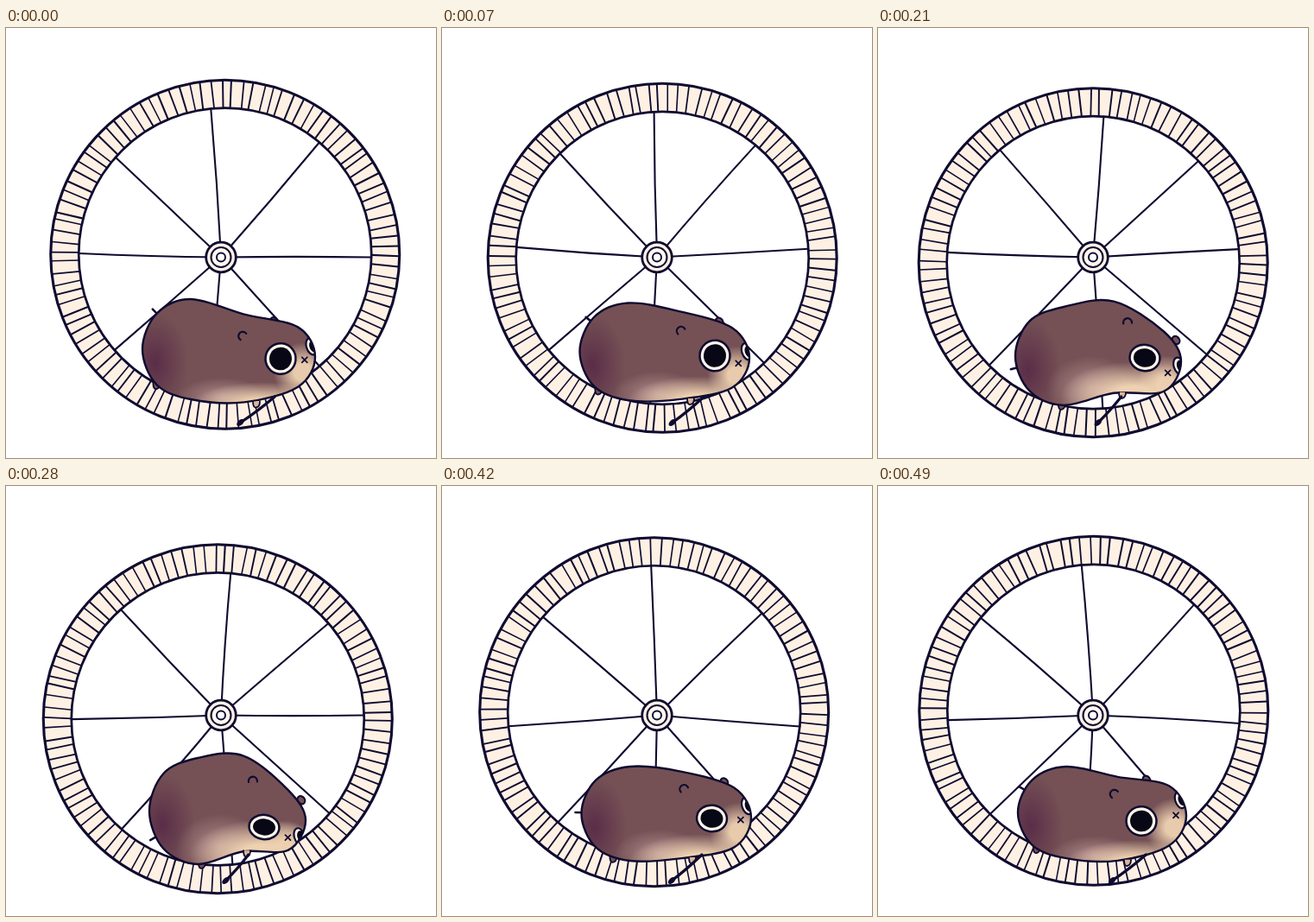
An HTML page with a canvas for the animation above (0.56 s loop, 498x498 px).

```html
<!DOCTYPE html>
<html lang="en">
<head>
<meta charset="utf-8">
<title>Hamster wheel</title>
<style>
html, body { margin: 0; width: 100%; height: 100%; overflow: hidden; background: #fff; }
canvas { display: block; width: 498px; height: 498px; }
</style>
</head>
<body>
<canvas id="stage" width="498" height="498"></canvas>
<script>
const ctx = document.getElementById('stage').getContext('2d');
const INK = '#0f0b30', CREAM = '#fef1e4', FUR = '#755155', EYE = '#080716';
const STEP = 70, STEPS = 8, RUNGS = 102, TAU = Math.PI * 2;
const OUTER = 202, INNER = 169.5, HUB = [249, 265.5];

// the drawn key poses: eye x and y, head tilt, head x, rump x, height of the back
const keys = new Map([
  [0, [318, 383, -19, 318, 214, 314]],
  [2, [314, 376, -3, 314, 217, 323]],
  [3, [309, 382, 8, 311, 215, 323]],
  [4, [299, 395, 30, 307, 222, 315]],
  [5, [320, 382, -13, 319, 217, 325]],
  [7, [305, 388, -29, 317, 218, 325]]
]);

const mid = (a, b) => (a + b) / 2;
const rad = deg => deg * TAU / 360;
const polar = ([x, y], deg, rx, ry = rx) => [x + rx * Math.cos(rad(deg)), y + ry * Math.sin(rad(deg))];

function keyAt(i) {
  const next = keys.get(i + 1);
  return keys.get(i) || keys.get(i - 1).map((v, k) => mid(v, next[k]));
}

function random(seed) {
  return () => {
    seed = (seed * 16807) % 2147483647;
    return seed / 2147483647;
  };
}

// every cyclic movement is a cosine over the loop
const swing = (i, shift = 0) => Math.cos(rad(i * 360 / STEPS + shift));

function makePose(i) {
  const [eyeX, eyeY, tilt, headX, rumpX, top] = keyAt(i);
  const bottom = 434 - 4 * swing(i), rx = 56, ry = (bottom - top) / 2;
  const rump = [rumpX, top + ry];
  const head = [headX, 384 - 3 * swing(i)];
  const onRump = deg => polar(rump, deg, rx, ry);
  const onHead = deg => polar(head, deg, 40);
  const bend = swing(i, 18);
  const brow = onHead(-60), chin = onHead(60);
  const back = [mid(rumpX, brow[0]), mid(top, brow[1]) - 10 + 12 * bend];
  const belly = [mid(rumpX, chin[0]), mid(bottom, chin[1]) + 2 + 9 * bend];
  const tailAngle = 188 + 38 * swing(i, -10);
  return {
    rump, head, belly, bend, tilt,
    outline: [onRump(180), onRump(225), onRump(270), back, brow, onHead(0), chin, belly, onRump(90), onRump(135)],
    eye: [eyeX, eyeY],
    squint: 16 - 2 * swing(i, -202),
    farEye: polar(head, tilt, 38),
    mouth: polar(head, 22 + 0.8 * tilt, 28),
    ear: polar(head, 227 - 19 * bend, 50),
    farEar: polar(head, 293 - 35 * bend, 42),
    tail: [polar(rump, tailAngle, rx - 2, ry - 2), polar(rump, tailAngle, rx + 7, ry + 7)],
    rearFoot: onRump(110 + 25 * swing(i)),
    frontFoot: [headX - 28, belly[1] + 1],
    hip: [296 + 16 * bend, 427],
    paw: [263 + 9 * swing(i, 20), 457]
  };
}

function stroke(width) {
  ctx.lineWidth = width;
  ctx.strokeStyle = INK;
  ctx.stroke();
}

function fill(color) {
  ctx.fillStyle = color;
  ctx.fill();
}

function oval([x, y], rx, ry = rx, tilt = 0) {
  ctx.beginPath();
  ctx.ellipse(x, y, rx, ry, tilt, 0, TAU);
}

function line(from, to, width) {
  ctx.beginPath();
  ctx.moveTo(...from);
  ctx.lineTo(...to);
  stroke(width);
}

function curve(from, bend, to, width) {
  ctx.beginPath();
  ctx.moveTo(...from);
  ctx.quadraticCurveTo(...bend, ...to);
  stroke(width);
}

// closed Catmull-Rom curve
function blob(points) {
  const n = points.length, at = i => points[(i + n) % n];
  const path = new Path2D();
  path.moveTo(...at(0));
  for (let i = 0; i < n; i++) {
    const [a, b, c, d] = [at(i - 1), at(i), at(i + 1), at(i + 2)];
    path.bezierCurveTo(
      b[0] + (c[0] - a[0]) / 6, b[1] + (c[1] - a[1]) / 6,
      c[0] - (d[0] - b[0]) / 6, c[1] - (d[1] - b[1]) / 6, ...c);
  }
  path.closePath();
  return path;
}

function glow([x, y], rx, ry, rgb, alpha, core = 0) {
  ctx.save();
  ctx.translate(x, y);
  ctx.scale(rx, ry);
  const g = ctx.createRadialGradient(0, 0, core, 0, 0, 1);
  g.addColorStop(0, `rgba(${rgb},${alpha})`);
  g.addColorStop(1, `rgba(${rgb},0)`);
  oval([0, 0], 1);
  fill(g);
  ctx.restore();
}

// where a ray from the hub meets the inner rim
function rimHit(center, deg) {
  const dx = HUB[0] - center[0], dy = HUB[1] - center[1];
  const b = dx * Math.cos(rad(deg)) + dy * Math.sin(rad(deg));
  return polar(HUB, deg, -b + Math.sqrt(b * b - dx * dx - dy * dy + INNER * INNER));
}

function drawWheel(i) {
  const rnd = random(7919 * (i + 3));
  const center = polar([249.5, 266], i * 45 - 42, 5.7);

  oval(center, OUTER);
  fill(CREAM);
  for (let k = 0; k < RUNGS; k++) {
    const deg = (k + 0.35 * rnd()) * 360 / RUNGS;
    const slant = (rnd() - 0.5) * 0.8;
    line(polar(center, deg, INNER), polar(center, deg + slant, OUTER - 1), 1.5 + rnd() * 0.6);
  }
  oval(center, OUTER);
  stroke(3.1);
  oval(center, INNER);
  fill('#fff');
  stroke(2.7);

  for (let k = 0; k < 8; k++) {
    const deg = k * 45 + 4.5 * Math.sin(rad(i * 45 + 180 - k * 40));
    const end = rimHit(center, deg);
    const bend = [mid(HUB[0], end[0]) + rnd() * 4 - 2, mid(HUB[1], end[1]) + rnd() * 4 - 2];
    curve(HUB, bend, end, 2.1);
  }

  for (const [r, color, width] of [[17.3, CREAM, 2.8], [11.5, '#fff8f1', 2.1], [5, '#fff', 2]]) {
    oval(HUB, r);
    fill(color);
    stroke(width);
  }
}

function drawFoot([x, y], color) {
  ctx.beginPath();
  ctx.moveTo(x - 4, y - 2);
  ctx.quadraticCurveTo(x - 4, y + 6, x, y + 5);
  ctx.quadraticCurveTo(x + 4, y + 4, x + 4, y - 2);
  fill(color);
  stroke(1.8);
}

function drawFur(pose, body) {
  const { rump, belly, mouth, bend } = pose;
  const shift = ([x, y], dx, dy) => [x + dx, y + dy];
  ctx.save();
  ctx.fillStyle = FUR;
  ctx.fill(body);
  ctx.clip(body);
  glow(shift(rump, -41, 16), 38, 60, '78,30,66', 0.7);
  glow(shift(belly, -26, -6), 52, 30 - 8 * bend, '214,178,176', 0.6);
  glow(shift(belly, 22, 4), 84, 34 - 7 * bend, '238,209,177', 1, 0.3);
  glow(shift(mouth, -2, 14), 34, 34, '238,209,177', 0.95, 0.3);

  oval(pose.farEye, 6, 10, -0.3);
  fill('#fff4e8');
  stroke(2.2);
  oval(shift(pose.farEye, 2, 0), 4.5, 7, -0.3);
  fill(EYE);
  ctx.restore();

  ctx.lineWidth = 2.4;
  ctx.strokeStyle = INK;
  ctx.stroke(body);
}

function drawFace({ eye, squint, ear, mouth: [x, y], bend }) {
  oval(eye, 17.5, squint, 0.12);
  fill('#fff6e9');
  stroke(2.5);
  oval(eye, 13, squint - 4.5, 0.12);
  fill(EYE);

  const turn = -0.4 * bend;
  ctx.beginPath();
  ctx.arc(...ear, 5, TAU * 0.4 + turn, TAU * 0.96 + turn);
  stroke(2.2);
  line([x - 3, y - 3], [x + 3, y + 3], 1.8);
  line([x + 3, y - 3], [x - 3, y + 3], 1.8);
}

function drawHamster(pose) {
  line(...pose.tail, 2.6);
  drawFoot(pose.rearFoot, FUR);
  oval(pose.farEar, 4, 5, -0.6);
  fill(FUR);
  stroke(2.1);
  drawFur(pose, blob(pose.outline));
  drawFace(pose);
  drawFoot(pose.frontFoot, '#d9b69a');
  const { hip, paw } = pose;
  curve(hip, [mid(hip[0], paw[0]), 444], paw, 3.2);
  oval(paw, 5, 3, -0.7);
  fill(INK);
}

function draw(i) {
  ctx.fillStyle = '#fff';
  ctx.fillRect(0, 0, 498, 498);
  ctx.lineCap = ctx.lineJoin = 'round';
  drawWheel(i);
  drawHamster(makePose(i));
}

function tick() {
  draw(Math.floor(performance.now() / STEP) % STEPS);
  requestAnimationFrame(tick);
}
tick();
</script>
</body>
</html>
```
